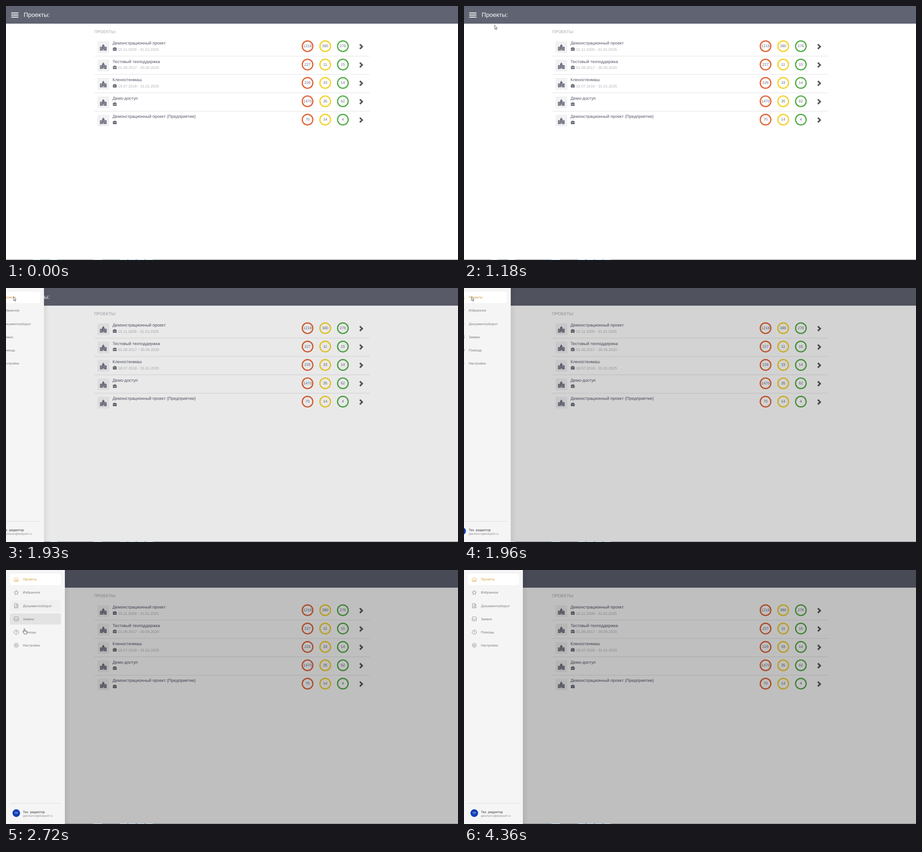
Recreate the animation shown at these times as an HTML page. Size 998x561 px, loop 5280 ms.

```html
<!DOCTYPE html>
<html lang="ru">
<head>
<meta charset="utf-8">
<title>Проекты</title>
<style>
html, body { margin: 0; width: 100%; height: 100%; overflow: hidden; background: #fff; }
svg { display: block; width: 998px; height: 561px; }
text { font-family: "Liberation Sans", Arial, sans-serif; text-rendering: geometricPrecision; }
.menu text { font-family: Inter, Roboto, sans-serif; font-size: 7.15px; fill: #777; }
.menu .email { font-size: 6.24px; fill: #8a8a8a; }
.menu .dark { fill: #35363c; }
.menu .gold { fill: #cb9a2c; }
.menu .initials { font-size: 6px; fill: #fff; text-anchor: middle; }
.icon { fill: none; stroke: #858585; stroke-width: .85; stroke-linejoin: round; stroke-linecap: round; }
.icon.gold { fill: none; stroke: #dca545; }
.title { font-size: 9.36px; fill: #54576a; }
.date { font-size: 8.32px; fill: #b2b3b9; }
.count { font-size: 8.32px; fill: #666979; text-anchor: middle; }
.ring { fill: #fff; stroke-width: 2.7; }

.shade, .menu, .hover, .profile, .cursor, .arrow, .hand {
  animation-duration: 5280ms; animation-iteration-count: infinite; animation-timing-function: linear;
}
.shade { opacity: 0; animation-name: shade; }
.menu { transform: translateX(-145px); animation-name: slide; }
.hover { opacity: 0; animation-name: hover; }
.profile { opacity: 0; animation-name: profile; }
.cursor { animation-name: move; }
.arrow { animation-name: arrow; animation-timing-function: step-end; }
.hand { animation-name: hand; animation-timing-function: step-end; }

@keyframes slide {
  0%, 35.37% { transform: translateX(-145px); }
  35.38% { transform: translateX(-130px); animation-timing-function: cubic-bezier(0, 0, .2, 1); }
  39.36%, 100% { transform: none; }
}
@keyframes shade {
  0%, 35.47% { opacity: 0; animation-timing-function: cubic-bezier(.4, 0, .2, 1); }
  39.26%, 100% { opacity: .25; }
}
@keyframes hover {
  0% { opacity: 0; }
  1.5%, 3.2% { opacity: 1; }
  7.2%, 100% { opacity: 0; }
}
@keyframes profile {
  0%, 68% { opacity: 0; }
  70%, 80.87% { opacity: 1; }
  82.58%, 100% { opacity: 0; }
}
@keyframes move {
  0%, .57% { transform: translate(316px, 560px); }
  4.6% { transform: translate(332px, 486px); }
  7.2% { transform: translate(345px, 443px); }
  10.04% { transform: translate(354px, 460px); }
  11.36% { transform: translate(369px, 472px); }
  20.08% { transform: translate(111px, 77px); }
  22.35% { transform: translate(67.5px, 42px); animation-timing-function: ease-out; }
  28.41%, 37.6% { transform: translate(16.3px, 18.8px); }
  41.48% { transform: translate(24px, 34px); }
  51.52% { transform: translate(40.5px, 129px); }
  57.95% { transform: translate(52px, 178px); }
  61.74% { transform: translate(72px, 297px); }
  64.02% { transform: translate(81px, 424px); animation-timing-function: ease-out; }
  70.08%, 100% { transform: translate(64px, 544px); }
}
@keyframes arrow {
  0% { opacity: 0; }
  .57% { opacity: 1; }
  26% { opacity: 0; }
  35.6% { opacity: 1; }
  41.2% { opacity: 0; }
  58% { opacity: 1; }
  66.4%, 100% { opacity: 0; }
}
@keyframes hand {
  0% { opacity: 0; }
  26% { opacity: 1; }
  35.6% { opacity: 0; }
  41.2% { opacity: 1; }
  58% { opacity: 0; }
  66.4% { opacity: 1; }
  80.87%, 100% { opacity: 0; }
}
</style>
</head>
<body>
<svg viewBox="0 0 998 561" xmlns="http://www.w3.org/2000/svg">
  <defs>
    <linearGradient id="edge">
      <stop stop-color="#000" stop-opacity=".06"/>
      <stop offset="1" stop-color="#000" stop-opacity="0"/>
    </linearGradient>
    <g id="building">
      <path fill="#5a5d6d" d="M0 6.2H4V14.5H0ZM4.6 14.5V3.2L6.6 2V.2H7.9V2L9.8 3.2V14.5ZM10.4 6.2H14.5V14.5H10.4Z"/>
      <path fill="#f2f2f4" d="M1.3 8h1.4v1.5H1.3zM1.3 11h1.4v1.5H1.3zM6.5 4.8h1.4v1.5H6.5zM6.5 8h1.4v1.5H6.5zM6.3 11.2h1.8v3.3H6.3zM11.8 8h1.4v1.5h-1.4zM11.8 11h1.4v1.5h-1.4z"/>
    </g>
    <g id="case">
      <path fill="none" stroke="#5d606c" d="M2.6 2V.7H6.6V2"/>
      <path fill="#5d606c" d="M.8 1.6H8.4L9.3 4H0ZM.4 4.9H8.9V6.8Q8.9 7.8 7.9 7.8H1.4Q.4 7.8 .4 6.8Z"/>
      <path stroke="#a9abb3" stroke-width=".8" d="M.4 4.4H8.9M3.2 5.8H6"/>
    </g>
  </defs>

  <rect width="998" height="561" fill="#fff"/>
  <rect width="998" height="39" fill="#606372"/>
  <path d="M11.5 15.6h16M11.5 20h16M11.5 24.4h16" stroke="#fff" stroke-width="2"/>
  <text x="39" y="24" font-size="13.52" fill="#fff">Проекты:</text>
  <text x="194.8" y="60.3" font-size="9.36" fill="#a5a7b0">ПРОЕКТЫ:</text>
  <g id="rows"></g>
  <rect class="shade" width="998" height="560"/>
  <path d="M0 560.5H998" stroke="#7c7f82"/>
  <path d="M60 560.5h15m23 0h15m80 0h19m40 0h15m4 0h15m4 0h15m4 0h15" stroke="#b4dcf2"/>

  <g class="menu">
    <rect x="130" width="12" height="561" fill="url(#edge)"/>
    <rect width="130" height="561" fill="#f5f5f5"/>
    <rect x="8.5" y="8.3" width="113" height="25" rx="4" fill="#fff"/>
    <g id="items"></g>
    <path d="M8.5 515.5H121.5" stroke="#dcdcdc"/>
    <rect class="profile" x="8.5" y="524.5" width="113" height="25" rx="4" fill="#e3e3e3"/>
    <circle cx="22.7" cy="537" r="8.4" fill="#0f40b6"/>
    <text class="initials" x="22.7" y="539.2">ТР</text>
    <text class="dark" x="37.2" y="536.7">Тех. редактор</text>
    <text class="email" x="37.2" y="545.4">gdumarov@dubpelt.ru</text>
  </g>

  <g class="cursor" stroke="#222" stroke-width=".7" fill="#fff" stroke-linejoin="round">
    <path class="arrow" d="M.3 .3V9L2.2 7.2L3.7 10.5L5 9.9L3.6 6.7H6.2Z"/>
    <path class="hand" d="M-1 1Q0 -.8 1 1V4.8L4.6 5.5Q5.9 5.9 5.7 7.3L5 10.4V12.3H-.4V10.8L-3.4 7.4Q-3.7 6 -2.3 6.3L-1 7.5ZM1 4.8V6.5M2.8 5.2V6.6M4.4 5.5V6.8"/>
  </g>
</svg>
<script>
const projects = [
  ["Демонстрационный проект", "15.11.2009 - 31.01.2025", [1218, 380, 276]],
  ["Тестовый техподдержка", "01.08.2017 - 30.06.2020", [227, 11, 15]],
  ["Кленостенмаш", "18.07.2018 - 31.01.2025", [226, 33, 14]],
  ["Демо-доступ", "", [1470, 35, 62]],
  ["Демонстрационный проект (Предприятие)", "", [70, 14, 4]]
];
const ringColors = ["#e1653a", "#f2d22a", "#54ad49"];

const badge = (count, i) => `
  <circle class="ring" cx="${665.8 + i * 39}" cy="88.8" r="11.7" stroke="${ringColors[i]}"/>
  <text class="count" x="${665.8 + i * 39}" y="91.3">${count}</text>`;

document.getElementById("rows").innerHTML = projects.map(([name, dates, counts], i) => `
  <g transform="translate(0 ${i * 40.55})">
    <rect x="202" y="78" width="26" height="26" rx="2" fill="#f2f2f4"/>
    <use href="#building" x="207.6" y="84"/>
    <text class="title" x="235.2" y="85.2">${name}</text>
    <use href="#case" x="235.5" y="91"/>
    <text class="date" x="247.4" y="98.7">${dates}</text>
    ${counts.map(badge).join("")}
    <path d="M781.3 84.6L786.5 89.7L781.3 94.8" fill="none" stroke="#56575d" stroke-width="3.4"/>
    ${i < 4 ? '<path d="M195 110.7H803" stroke="#dedee2" stroke-width=".9"/>' : ""}
  </g>`).join("");

// Label, icon outline around (0, 0), start of the hover in ms
const items = [
  ["Проекты", "M-4.3 -.8L0 -4.7L4.3 -.8V4.5H-4.3ZM-1.4 4.5V1H1.4V4.5"],
  ["Избранное", "M0 -4.8L1.5 -1.7L4.8 -1.3L2.4 1L3 4.4L0 2.8L-3 4.4L-2.4 1L-4.8 -1.3L-1.5 -1.7Z", 2230],
  ["Документооборот", "M-3.8 -4.7H1.4L3.8 -2.2V4.7H-3.8ZM1.2 -4.5V-2H3.6M-1.8 .2H1.8M-1.8 2.4H1.8", 2390],
  ["Заявки", "M-3 -4.5H3Q4.5 -4.5 4.5 -3V3Q4.5 4.5 3 4.5H-3Q-4.5 4.5 -4.5 3V-3Q-4.5 -4.5 -3 -4.5ZM-4.5 .3H-2Q-1.5 2.1 0 2.1Q1.5 2.1 2 .3H4.5", 2570],
  ["Помощь", "M-4.9 0A4.9 4.9 0 1 1 4.9 0A4.9 4.9 0 1 1 -4.9 0M-1.3 -1.2Q-1.1 -2.5 0 -2.5Q1.4 -2.4 1.4 -1.2Q1.2 -.2 0 .2V.8M0 2.4V2.5", 2730],
  ["Настройки", "M0 -4.8L1.8 -4L4 -2.6V2.6L1.8 4L0 4.8L-1.8 4L-4 2.6V-2.6L-1.8 -4ZM-2 0A2 2 0 1 1 2 0A2 2 0 1 1 -2 0", 2910]
];

document.getElementById("items").innerHTML = items.map(([label, outline, start], i) => {
  const tone = i ? "" : "gold";
  const hover = start
    ? `<rect class="hover" style="animation-delay:${start}ms" x="8.5" y="-12.5" width="113" height="25" rx="4" fill="#e3e3e3"/>`
    : "";
  return `<g transform="translate(0 ${20.8 + i * 29.1})">${hover}
    <path class="icon ${tone}" transform="translate(22.7 0)" d="${outline}"/>
    <text class="${tone}" x="37.2" y="2.5">${label}</text></g>`;
}).join("");
</script>
</body>
</html>
```
